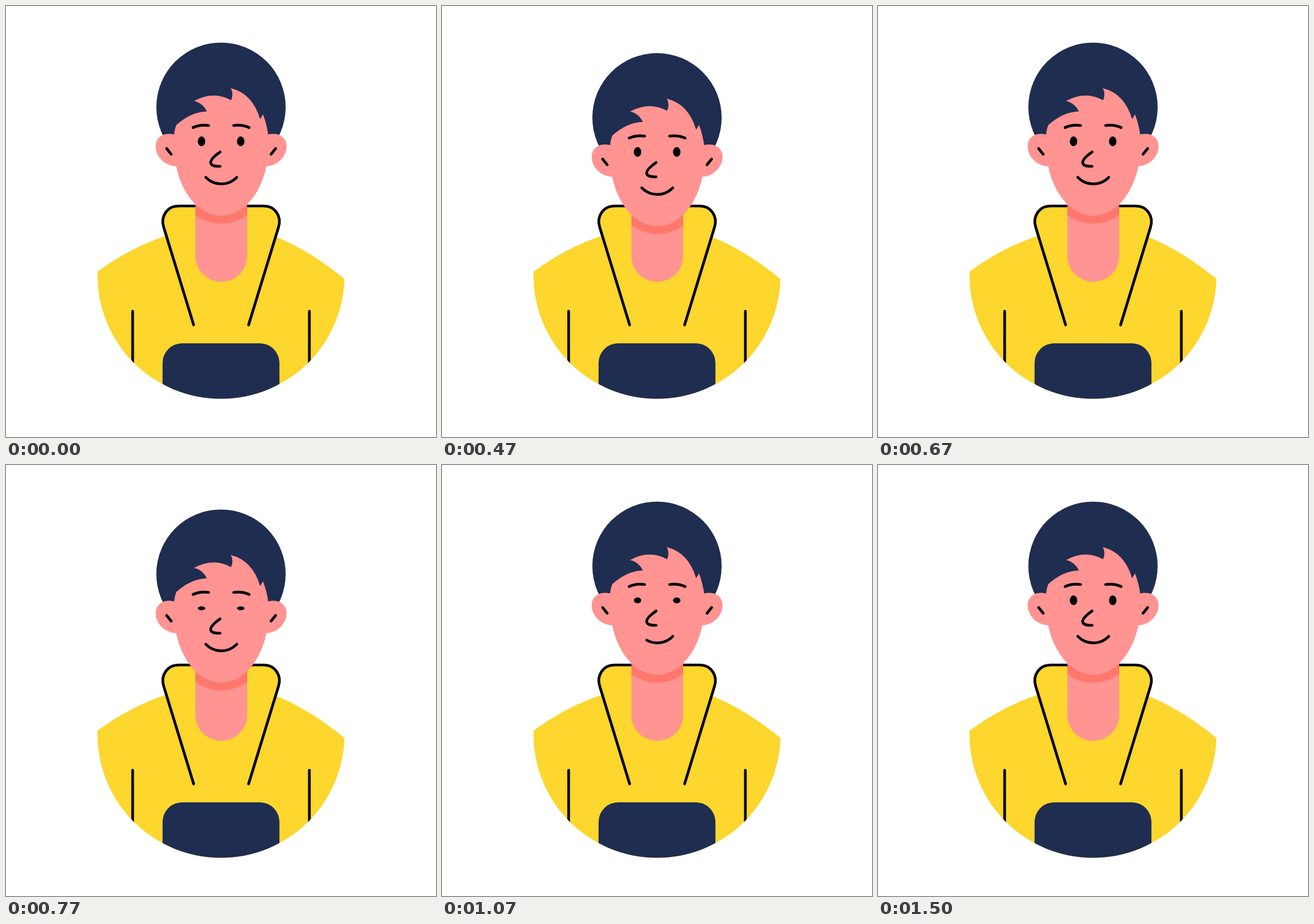
Recreate the animation shown at these times as an HTML page with a canvas. Size 747 by 750 pixels, loop 1.66 s.

```html
<!DOCTYPE html>
<html lang="en">
<head>
<meta charset="utf-8">
<title>Nodding portrait</title>
<style>
html, body { margin: 0; width: 100%; height: 100%; overflow: hidden; background: #fff; }
canvas { display: block; }
</style>
</head>
<body>
<canvas id="stage" width="747" height="750"></canvas>
<script>
const ctx = document.getElementById('stage').getContext('2d');
const LOOP = 1660;
const NAVY = '#1f2d50', YELLOW = '#fdd62e', SKIN = '#ff9492', SHADE = '#ff776d', INK = '#000';
const CX = 373.7;

const fill = (path, color) => { ctx.fillStyle = color; ctx.fill(new Path2D(path)); };
const stroke = path => ctx.stroke(new Path2D(path));
const circle = (x, y, r, color) => ellipse(x, y, r, r, color);

function ellipse(x, y, rx, ry, color) {
  ctx.beginPath();
  ctx.ellipse(x, y, rx, ry, 0, 0, 2 * Math.PI);
  ctx.fillStyle = color;
  ctx.fill();
}

// Draws once as is and once reflected about the vertical axis.
function mirrored(draw) {
  draw();
  ctx.save();
  ctx.translate(2 * CX, 0);
  ctx.scale(-1, 1);
  draw();
  ctx.restore();
}

// 30 steps per second, with step times rounded to 10 ms.
function stepAt(ms) {
  const n = Math.floor((ms + 5) * 0.03);
  return Math.round(n * 10 / 3) * 10 > ms ? n - 1 : n;
}

// Two linear there-and-back swings, five steps each way.
function swing(n, start) {
  const p = n - start;
  if (p <= 0 || p >= 20) return 0;
  return 1 - Math.abs(p % 10 - 5) / 5;
}

function drawBody() {
  ctx.save();
  ctx.beginPath();
  ctx.arc(373.5, 469, 214.5, 0, 2 * Math.PI);
  ctx.clip();
  fill('M158 463 Q215 421 276 400.5 L472 403 Q530 427 589 476 V700 H158 Z', YELLOW);
  ctx.beginPath();
  ctx.roundRect(272, 587, 203, 150, 34);
  ctx.fillStyle = NAVY;
  ctx.fill();
  stroke('M220 531 V700 M527 531 V700');
  ctx.restore();

  fill('M326 555 L274 385 C268 366 280 348 300 348 H447.5 C467 348 479.5 366 473.5 385 L421.5 555 Z', YELLOW);
  mirrored(() => stroke('M326 555 L274 385 C268 366 280 348 300 348 H335'));
}

function drawNeck(dy) {
  ctx.save();
  ctx.clip(new Path2D('M329 346 H419 V435 A45 45 0 0 1 329 435 Z'));
  ctx.fillStyle = SKIN;
  ctx.fillRect(320, 340, 110, 150);
  ctx.translate(0, dy);
  fill('M328 320 V363.5 Q374 394 420 363.5 V320 Z', SHADE);
  ctx.restore();
}

function drawMouth(n) {
  let from = 0, to = 1;
  if (n > 30 && n < 42) from = Math.min((n - 30) / 11, 0.99);
  else if (n >= 42 && n < 45) to = Math.max((n - 42) / 3, 0.01);
  const half = 0.806;
  const angle = f => Math.PI / 2 + half - 2 * half * f;
  ctx.beginPath();
  ctx.arc(374, 272.2, 37.4, angle(from), angle(to), true);
  ctx.stroke();
}

function drawHead(n, dy) {
  ctx.save();
  ctx.translate(0, dy);
  circle(373.5, 176, 112.3, NAVY);

  fill('M374 243 H292 A82 122 0 0 0 456 243 Z', SKIN);
  fill('M292 244 V224 Q293 214 296 207 Q322 184 349 183.5 Q341 168 326.5 165.5 ' +
       'Q360 147 391 164 Q396 153 390.5 143 Q428 152 441.5 197 L446.5 188.5 ' +
       'Q453 206 455.5 224 V244 Z', SKIN);
  mirrored(() => {
    fill('M293 224 C270 218 260 232 260 244 C260 262 276 279 297 279 L310 250 Z', SKIN);
    stroke('M279 248 L287 258');
    stroke('M325 211.5 Q337 206 352 208');
  });

  const open = 1 - swing(n, 20);
  ellipse(339.7, 235.6, 6.5, 8.5 * open, INK);
  ellipse(407.8, 235.6, 6.5, 8.5 * open, INK);
  stroke('M372 254 C362 261 353.5 269 356 274.5 C358 279 366 279 372 279');
  drawMouth(n);
  ctx.restore();
}

function render(now) {
  const n = stepAt(now % LOOP);
  const dy = 22.9 * swing(n, 10);
  ctx.fillStyle = '#fff';
  ctx.fillRect(0, 0, 747, 750);
  ctx.strokeStyle = INK;
  ctx.lineWidth = 4.7;
  ctx.lineCap = ctx.lineJoin = 'round';
  drawBody();
  drawNeck(dy);
  drawHead(n, dy);
}

const began = performance.now();
function tick() {
  render(performance.now() - began);
  requestAnimationFrame(tick);
}
tick();
</script>
</body>
</html>
```
